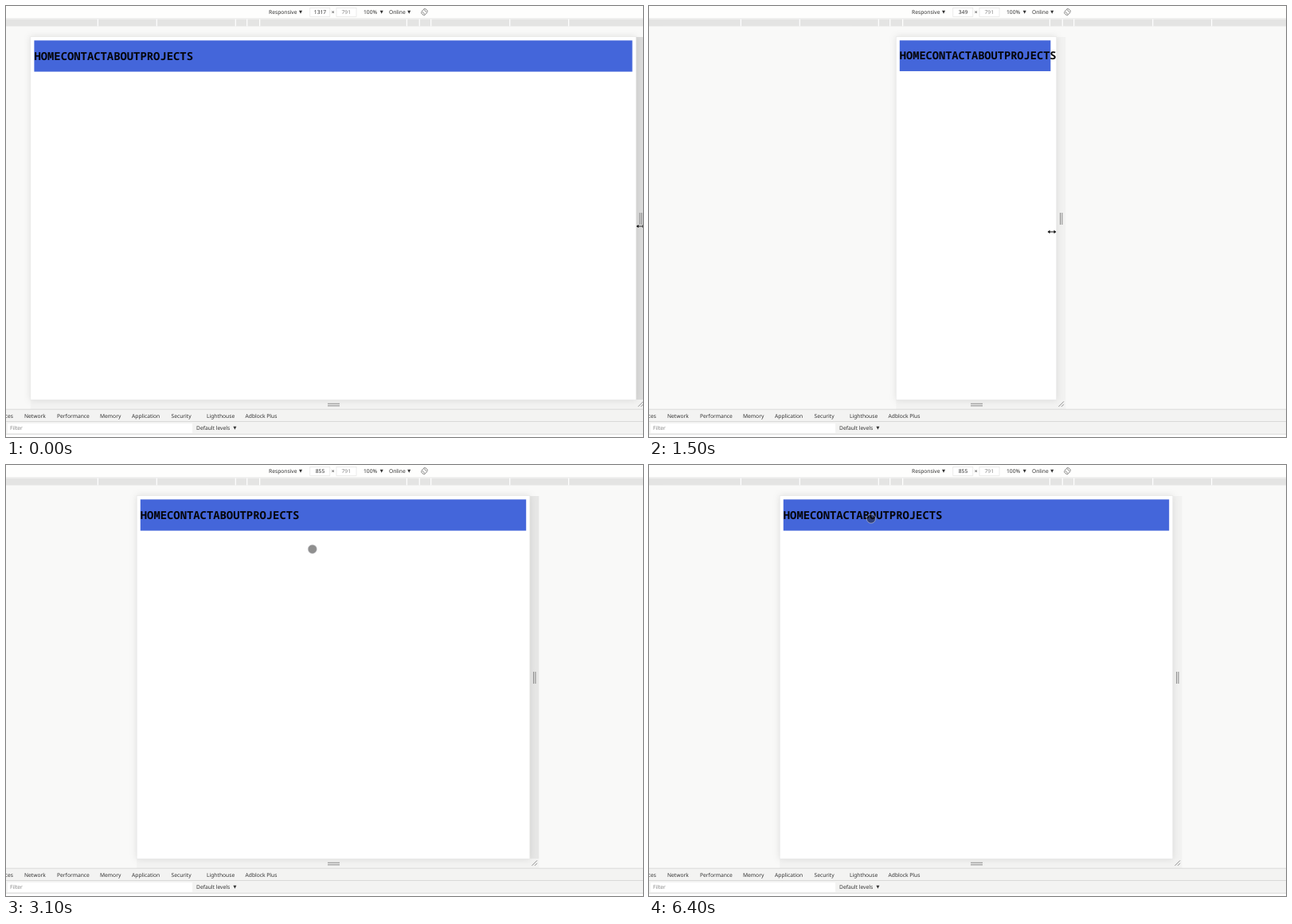
These frames come from a looping animation (800 px wide and 542 px high, 6.5 s). An HTML page:

```html
<!DOCTYPE html>
<html lang="en">
<head>
<meta charset="utf-8">
<title>Responsive navigation</title>
<style>
html, body { margin: 0; width: 100%; height: 100%; overflow: hidden; background: #f9f9f8; }
svg { display: block; width: 100%; height: 100%; }
text { font: 6.7px "Noto Sans", "Open Sans", sans-serif; fill: #333; text-rendering: geometricPrecision; white-space: pre; }
#menu { font: 700 24px "Noto Sans Mono", "DejaVu Sans Mono", monospace; fill: #050508; }
#page { filter: drop-shadow(0 0 4px rgba(0, 0, 0, .1)); }
.middle { text-anchor: middle; }
.end { text-anchor: end; }
.pale { fill: #888; }
</style>
</head>
<body>
<svg viewBox="0 0 800 542">
  <rect width="800" height="542" fill="#f9f9f8"/>
  <rect id="bottom" y="495" height="12" fill="#f3f3f2"/>
  <rect id="side" y="39" width="11.5" height="456"/>
  <rect id="page" y="38.7" height="456.5" fill="#fff" stroke="#e4e4e3" stroke-width=".6"/>
  <g id="content">
    <rect id="bar" x="8" y="8" height="68" fill="#4466da"/>
    <text id="menu" x="8" y="50.4">HOMECONTACTABOUTPROJECTS</text>
  </g>
  <g id="grips" fill="none" stroke="#858585">
    <path d="M4.8 260v15M7.1 260v15"/>
    <path d="M2.7 503.8l6.5-6.5M6.2 503.8l3-3" stroke-width=".9"/>
  </g>
  <path d="M404 500.2h15M404 502.8h15" stroke="#858585"/>

  <rect width="800" height="15.5" fill="#fefefd"/>
  <rect y="15" width="800" height=".8" fill="#eeeeed"/>
  <rect y="16.5" width="800" height="9" fill="#e4e4e3"/>
  <g id="marks" fill="#fff"></g>
  <g fill="#fff" stroke="#e3e3e2" stroke-width=".7">
    <rect x="381.8" y="2.3" width="25" height="11"/>
    <rect x="415" y="2.3" width="25" height="11"/>
  </g>
  <text id="width" class="middle" x="394.5" y="10.3"></text>
  <g fill="none" stroke="#666" stroke-width=".8">
    <rect x="-1.7" y="-3" width="3.4" height="6" rx=".5" transform="translate(525.5 7.5) rotate(-45)"/>
    <path d="M524.8 3.6a4 4 0 0 1 4.7 3.8M526.2 11.4a4 4 0 0 1-4.7-3.8"/>
  </g>
  <text x="330" y="10.3">Responsive</text>
  <text class="middle" x="410.7" y="10.3">×</text>
  <text class="middle pale" x="427.3" y="10.3">791</text>
  <text x="449" y="10.3">100%</text>
  <text x="481" y="10.3">Online</text>

  <rect y="507" width="800" height="32" fill="#f3f3f2"/>
  <path d="M0 507.2H800M0 522.5H800M0 538.6H800" stroke="#d3d3d2" stroke-width=".8"/>
  <rect y="539" width="800" height="3" fill="#fff"/>
  <rect x="2" y="525" width="232" height="12" fill="#fff"/>
  <text class="end" x="9" y="517.6">Sources</text>
  <text x="23" y="517.6">Network</text>
  <text x="64" y="517.6">Performance</text>
  <text x="118" y="517.6">Memory</text>
  <text x="158" y="517.6">Application</text>
  <text x="207.5" y="517.6">Security</text>
  <text x="252" y="517.6">Lighthouse</text>
  <text x="300.5" y="517.6">Adblock Plus</text>
  <text class="pale" x="5" y="533.2">Filter</text>
  <text x="239" y="533.2">Default levels</text>
  <path d="M368 5.8h4l-2 4zM469.7 5.8h4l-2 4zM504.2 5.8h4l-2 4zM285.4 528.7h4l-2 4z" fill="#333"/>

  <path id="arrow" d="M-5.5 0l3-2.3v1.7h5v-1.7l3 2.3-3 2.3V.6h-5v1.7z" fill="#111" stroke="#fff" stroke-width=".8" paint-order="stroke"/>
  <circle id="dot" r="5.6" fill="rgba(20,20,20,.48)" stroke="rgba(215,215,220,.6)" stroke-width=".9"/>
</svg>
<script>
const LOOP = 6500, STEP = 100;
const CENTER = 411, TOP = 38.7, SCALE = 0.5774;
const REPAINT_LAG = 26, MARGIN = 8, MIN_CONTENT = 354;
const $ = id => document.getElementById(id);

function set(id, attrs) {
  for (const key in attrs) $(id).setAttribute(key, attrs[key]);
}

const ramp = (t, from, to) => Math.min(1, Math.max(0, (t - from) / (to - from)));
const mix = (a, b, p) => a + (b - a) * p;

// Viewport width in CSS pixels: dragged narrow, then wide again.
const viewport = t => 1317 - 968 * ramp(t, 900, 1463) + 506 * ramp(t, 2048, 2548);
const leftEdge = w => CENTER - w * SCALE / 2;

// Stops of the pointer: time, x, y.
const stops = [[750, 797, 277], [1500, 506, 284], [2000, 506, 284], [2490, 668, 297],
  [2700, 668, 297], [3200, 314, 58], [3900, 192, 18], [4400, 356, 60]];

// After the last stop the pointer sways over the menu and comes to rest.
function sway(t) {
  const s = Math.min(t, 6100) - 5000;
  const dx = 56.5 * Math.exp(-s / 2550) * Math.cos(2 * Math.PI * s / 700);
  return [312 + dx, 64.5 - dx * 0.093];
}

function pointer(t) {
  const next = stops.findIndex(s => s[0] > t);
  if (next < 0) return sway(t);
  const a = stops[Math.max(0, next - 1)], b = stops[next];
  const p = ramp(t, a[0], b[0]);
  return [mix(a[1], b[1], p), mix(a[2], b[2], p)];
}

// Device breakpoints, mirrored around the centre.
for (const size of [320, 375, 425, 768, 1024]) {
  for (const x of [leftEdge(size), 2 * CENTER - leftEdge(size)]) {
    $('marks').insertAdjacentHTML('beforeend', `<rect x="${x - 0.6}" y="16.5" width="1.2" height="9"/>`);
  }
}

function draw(time) {
  const t = Math.floor(time % LOOP / STEP) * STEP;
  const w = viewport(t), width = w * SCALE, left = leftEdge(w), right = left + width;

  set('page', { x: left, width });
  set('bottom', { x: left, width: width + 11.5 });
  set('grips', { transform: `translate(${right})` });
  $('width').textContent = Math.round(w);

  const hover = 1 - ramp(t, 700, 900) + ramp(t, 2500, 2600) - ramp(t, 2900, 3300);
  set('side', { x: right, 'fill-opacity': 0.028 + 0.09 * hover });

  // The content keeps its previous layout for a moment and zooms out when it overflows.
  const layout = viewport(t - REPAINT_LAG), x0 = Math.max(left, leftEdge(layout));
  const zoom = SCALE * Math.min(1, w / MIN_CONTENT);
  set('content', { transform: `translate(${x0} ${TOP}) scale(${zoom})` });
  set('bar', { width: Math.min(layout - 2 * MARGIN, (right - x0) / zoom - MARGIN) });

  const [x, y] = pointer(t), touch = t >= 2900;
  const show = on => on ? 'visible' : 'hidden';
  set('arrow', { transform: `translate(${x} ${y})`, visibility: show(!touch) });
  set('dot', { cx: x, cy: y, visibility: show(touch) });
}

const start = performance.now();
function tick() {
  draw(performance.now() - start);
  requestAnimationFrame(tick);
}
tick();
</script>
</body>
</html>
```
